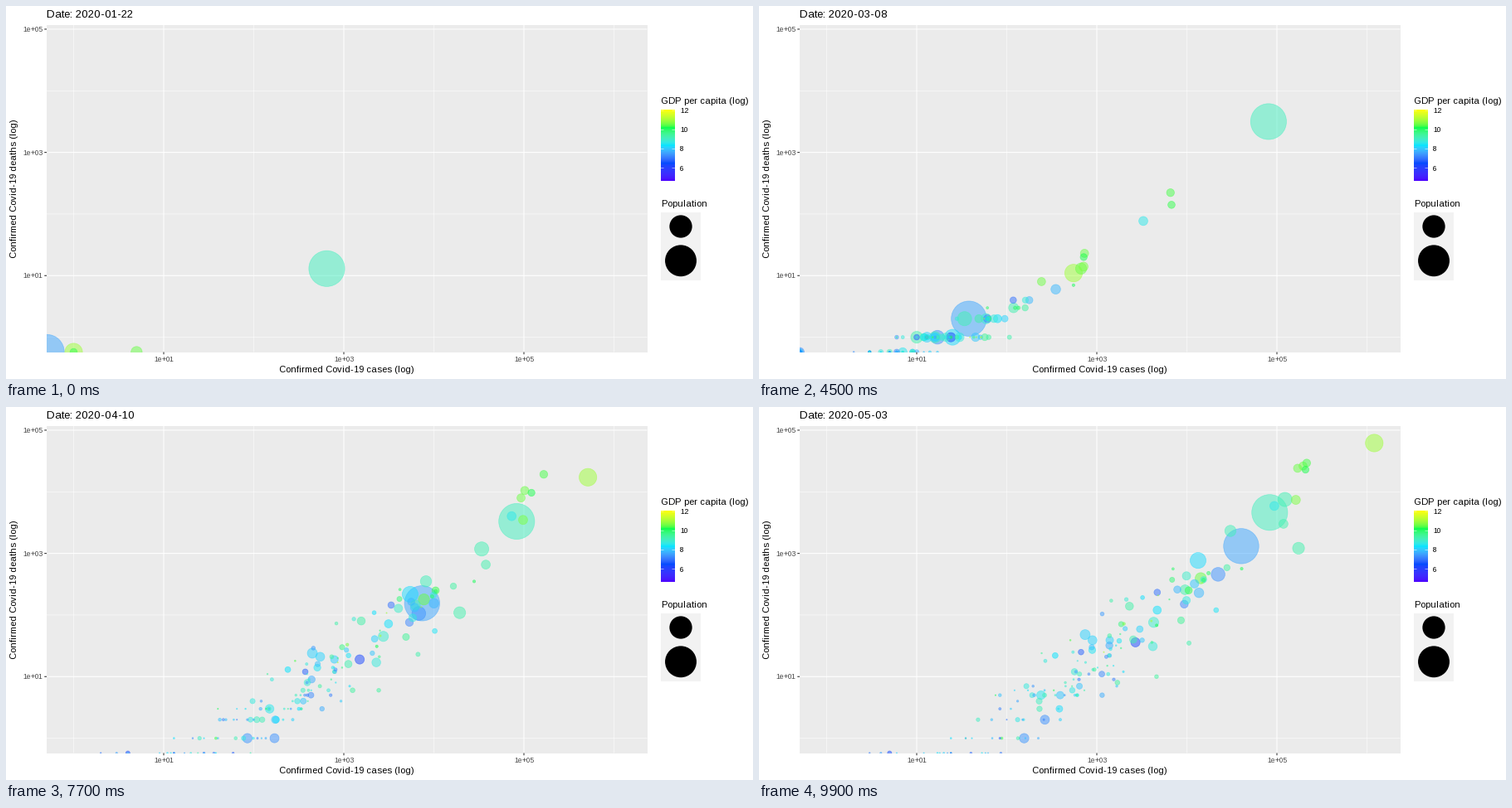
These frames come from a looping animation (900x450 px, 10000 ms). A matplotlib script:

```python
import numpy as np
import matplotlib.pyplot as plt
from matplotlib.animation import FuncAnimation
from matplotlib.patches import Circle, Rectangle

W, H = 900, 450
FRAMES, DAYS = 100, 102
LEFT, RIGHT, TOP, BOTTOM = 49, 772.5, 23, 417.5
GDP_MIN, GDP_MAX = 4.63, 12.09
ALPHA = 0.5
WIDTH = 11.5    # default time scale of an outbreak
FLOOR = -0.75   # log deaths before the rise, rounds to none
T = np.arange(FRAMES)

plt.rcParams["font.family"] = "Liberation Sans"
plt.rcParams["text.hinting_factor"] = 1


# ---- scales ----
def px(log_cases):
    return 81.5 + 108.5 * log_cases


def py(log_deaths):
    return 399.6 - 74.33 * log_deaths


def radius(pop):
    return 0.63 + 0.573 * np.sqrt(pop)


RGB_XYZ = np.array([[0.4124, 0.3576, 0.1805],
                    [0.2126, 0.7152, 0.0722],
                    [0.0193, 0.1192, 0.9505]])
WHITE = RGB_XYZ.sum(axis=1)


def to_lab(rgb):
    rgb = np.asarray(rgb) / 255
    lin = np.where(rgb > 0.04045, ((rgb + 0.055) / 1.055) ** 2.4, rgb / 12.92)
    q = lin @ RGB_XYZ.T / WHITE
    f = np.where(q > 0.008856, np.cbrt(q), 7.787 * q + 16 / 116)
    return np.stack([116 * f[..., 1] - 16, 500 * (f[..., 0] - f[..., 1]),
                     200 * (f[..., 1] - f[..., 2])], axis=-1)


def to_rgb(lab):
    fy = (lab[..., 0] + 16) / 116
    f = np.stack([fy + lab[..., 1] / 500, fy, fy - lab[..., 2] / 200], axis=-1)
    q = np.where(f > 0.2069, f ** 3, (f - 16 / 116) / 7.787) * WHITE
    lin = np.clip(q @ np.linalg.inv(RGB_XYZ).T, 0, 1)
    return np.where(lin > 0.0031308, 1.055 * lin ** (1 / 2.4) - 0.055, 12.92 * lin)


STOPS = to_lab([(76, 0, 255), (0, 76, 255), (0, 229, 255), (0, 255, 77), (255, 255, 0)])


def gdp_color(gdp):
    at = np.linspace(GDP_MIN, GDP_MAX, len(STOPS))
    return to_rgb(np.stack([np.interp(gdp, at, c) for c in STOPS.T], axis=-1))


# ---- bubbles ----
def rise(mid, width):
    return 1 / (1 + np.exp((mid - T) / width))


def outbreak(pop, gdp, start, cases, mid, deaths, width=WIDTH, recount=0):
    """Logistic growth of log counts up to cases and deaths; deaths lag behind.

    Counts are whole numbers, and zero counts sit on the panel's edge.
    """
    log_c = cases * rise(mid, width)
    log_d = FLOOR + (deaths - FLOOR) * rise(mid + 0.55 * width, width)
    log_d = log_d + recount * (T >= 84)
    c, d = np.rint(10 ** log_c), np.rint(10 ** log_d)
    x = px(np.log10(np.maximum(c, 1)))
    y = np.where(d > 0, py(np.log10(np.maximum(d, 1))), BOTTOM)
    x, y = np.where(T < start, LEFT, x), np.where(T < start, BOTTOM, y)
    lead = 8 if gdp < 8.5 else 0
    x = np.where(T < start - lead, -99, x)
    return pop, gdp_color(gdp), np.stack([x, y], axis=-1)


# population in millions, log GDP, start, final log cases, midpoint, final log deaths
LEADERS = [
    (1386, 9.09, 0, 4.92, -2.3, 3.52, 8, 0.144),
    (1339, 7.58, 8, 4.9, 56.5, 3.55, 15.5),
    (326, 11.0, 0, 6.15, 47.5, 4.9),
    (264, 8.25, 39, 4.2, 53, 3.0),
    (209, 9.2, 34, 5.2, 55, 4.05),
    (197, 7.35, 34, 4.45, 56, 2.8),
    (144, 9.28, 9, 5.45, 62, 3.35),
    (129, 9.14, 36, 4.6, 57, 3.55),
    (127, 10.56, 0, 4.3, 32, 2.8, 20),
    (83, 10.7, 5, 5.25, 43, 3.93),
    (81, 9.27, 47, 5.17, 53.5, 3.62),
    (81, 8.6, 28, 4.99, 35, 3.8),
    (67, 10.57, 2, 5.27, 43, 4.45),
    (66, 10.6, 9, 5.35, 47.5, 4.52),
    (60, 10.38, 9, 5.35, 34.5, 4.5),
    (51, 10.3, 0, 4.02, 27, 2.4, 6),
    (47, 10.25, 10, 5.36, 43.5, 4.43),
]


def random_outbreaks(count, seed):
    rng = np.random.default_rng(seed)
    for k in range(count):
        pop = 105 * np.exp(-k / 26)
        size = np.log(pop / 6)
        cases = np.clip(2.95 + 0.25 * size + rng.normal(0, 0.75), 0.5, 4.7)
        gdp = np.clip(8.7 + 0.75 * (cases - 3) - 0.2 * size + rng.normal(0, 0.9), 5.6, 11.6)
        deaths = 1.1 * cases - 2.0 + rng.normal(0, 0.4)
        mid = 52 - 4 * (cases - 3) + rng.normal(0, 4)
        start = round(mid - rng.uniform(2, 18))
        yield outbreak(pop, gdp, start, cases, mid, deaths)


bubbles = [outbreak(*row) for row in LEADERS] + list(random_outbreaks(150, 7))
bubbles.sort(key=lambda b: -b[0])
pops = np.array([b[0] for b in bubbles])
colors = np.array([[*b[1], ALPHA] for b in bubbles])
paths = np.stack([b[2] for b in bubbles], axis=1)

# ---- chart ----
fig = plt.figure(figsize=(W / 72, H / 72), dpi=72, facecolor="white")
ax = fig.add_axes([0, 0, 1, 1])


def box(x0, y0, x1, y1, color):
    return ax.add_patch(Rectangle((x0, y0), x1 - x0, y1 - y0, fc=color, ec="none", zorder=0))


def line(x, y, color, width, z=1):
    ax.plot(x, y, color=color, lw=width, zorder=z, solid_capstyle="butt", snap=False)


def label(x, y, text, size=11, color="black", **kw):
    return ax.text(x, y, text, size=size, color=color, va="baseline", **kw)


panel = box(LEFT, TOP, RIGHT, BOTTOM, "#EBEBEB")
for e in range(7):
    line([px(e)] * 2, [TOP, BOTTOM], "white", 1.07 if e % 2 else 0.53)
for e in range(6):
    line([LEFT, RIGHT], [py(e)] * 2, "white", 1.07 if e % 2 else 0.53)
for e in (1, 3, 5):
    name = f"1e+0{e}"
    line([px(e)] * 2, [BOTTOM, BOTTOM + 2.75], "#333333", 1.07)
    line([LEFT - 2.75, LEFT], [py(e)] * 2, "#333333", 1.07)
    label(px(e), 429, name, 8.8, "#4D4D4D", ha="center")
    label(44, py(e) + 3.2, name, 8.8, "#4D4D4D", ha="right")

title = label(49, 14, "", 13.2)
label(410.7, 442, "Confirmed Covid-19 cases (log)", ha="center")
label(13, 220.3, "Confirmed Covid-19 deaths (log)", ha="center",
      rotation=90, rotation_mode="anchor")

# ---- legends ----
label(789, 118, "GDP per capita (log)")
ramp = gdp_color(np.linspace(GDP_MAX, GDP_MIN, 200))[:, None]
ax.imshow(ramp, extent=(789, 806, 211, 125), aspect="auto", zorder=1)
for g in (6, 8, 10, 12):
    y = 125 + (GDP_MAX - g) * 86.4 / (GDP_MAX - GDP_MIN)
    line([789, 792.5], [y, y], "white", 0.5, 2)
    line([802.5, 806], [y, y], "white", 0.5, 2)
    label(812, y + 3, str(g), 8.8)

label(789, 242, "Population")
box(789, 249, 837, 331, "#F2F2F2")
for pop, y in ((500, 266), (1000, 307.3)):
    ax.add_patch(Circle((813, y), radius(pop) + 0.2, fc="black", ec="none", zorder=2))

dots = ax.scatter(paths[0, :, 0], paths[0, :, 1], s=(2 * radius(pops) - 0.7) ** 2,
                  facecolors=colors, edgecolors=colors, linewidths=0.71, zorder=3)
dots.set_clip_path(panel)

ax.set_xlim(0, W)
ax.set_ylim(H, 0)
ax.axis("off")


def update(i):
    day = np.datetime64("2020-01-22") + i * DAYS // (FRAMES - 1)
    title.set_text(f"Date: {day}")
    dots.set_offsets(paths[i])
    return dots, title


anim = FuncAnimation(fig, update, frames=FRAMES, interval=100, repeat=True, repeat_delay=0)
plt.show()
```
